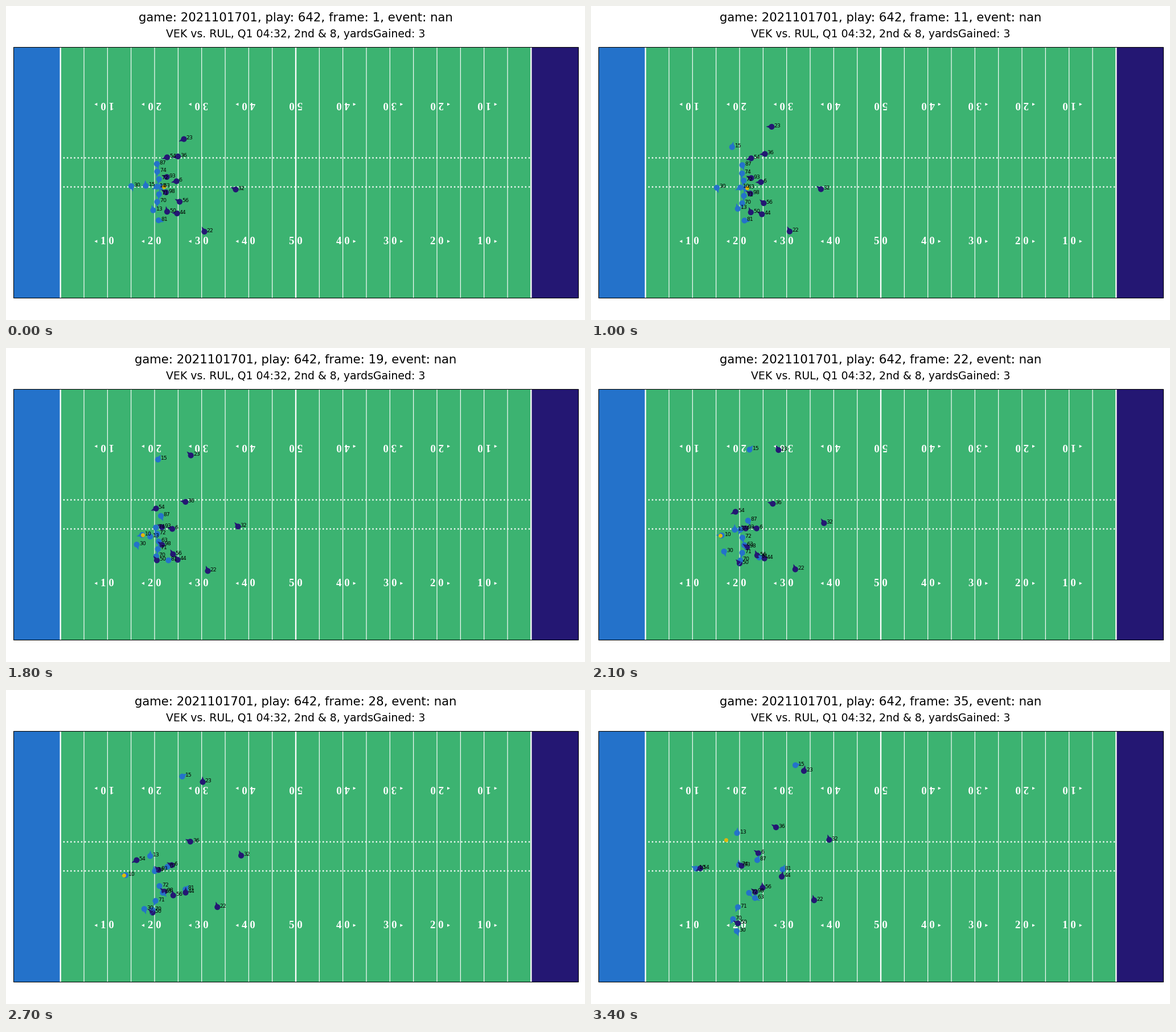
Write a matplotlib script that moves like this. It is 1017 px wide and 551 px high and loops after 3500 ms.

```python
import numpy as np
import matplotlib.pyplot as plt
from matplotlib.animation import FuncAnimation
from matplotlib.collections import PolyCollection
from matplotlib.patches import Polygon, Rectangle

W, H, DPI = 1017, 551, 84.75
FRAMES, INTERVAL = 35, 100
SNAP, RELEASE, LAST = 7, 30, FRAMES - 1
LEFT, RIGHT, TOP, BOTTOM = 13, 1005, 72.5, 512.5
YARD = (RIGHT - LEFT) / 120
BLUE, NAVY, GRASS, GOLD = "#2472CA", "#241773", "mediumseagreen", "#E0B80A"
TIMES = np.arange(FRAMES)

plt.rcParams["font.family"] = "DejaVu Sans"
fig = plt.figure(figsize=(12, (H + 1e-3) / DPI), dpi=DPI, facecolor="white")
ax = fig.add_axes([0, 0, 1, 1])
ax.set_xlim(0, W)
ax.set_ylim(H, 0)
ax.axis("off")


def yard_x(yards):
    return LEFT + yards * YARD


def progress(start, end):
    return np.clip((TIMES - start) / (end - start), 0, 1)


def path(points, start):
    """Spline through evenly timed points; late starters begin at rest."""
    p = np.array(points, float)
    m = np.gradient(p, axis=0)
    m[-1] = 2 * (p[-1] - p[-2]) - m[-2]
    m[0] = 0 if start else 2 * (p[1] - p[0]) - m[1]
    s = progress(start, LAST) * (len(p) - 1)
    i = np.minimum(s.astype(int), len(p) - 2)
    u = (s - i)[:, None]
    a, b = p[i], p[i + 1]
    return (a + (b - a) * u**2 * (3 - 2 * u)
            + u * (1 - u) * (m[i] * (1 - u) - m[i + 1] * u))


def draw_box(x0, x1, **style):
    ax.add_patch(Rectangle((x0, TOP), x1 - x0, BOTTOM - TOP, **style))


def draw_line(xs, ys, **style):
    ax.plot(xs, ys, color="white", snap=False, zorder=1, **style)


def draw_field():
    draw_box(LEFT, RIGHT, fc=GRASS, lw=0, zorder=0)
    draw_box(LEFT, yard_x(10), fc=BLUE, lw=0, zorder=0)
    draw_box(yard_x(110), RIGHT, fc=NAVY, lw=0, zorder=0)
    for yards in range(10, 111, 5):
        draw_line([yard_x(yards)] * 2, [TOP, BOTTOM],
                  lw=1 if (yards - 10) % 50 else 2, solid_capstyle="butt")
    for y in (266.5, 317.5):
        draw_line([yard_x(10.6), yard_x(110)], [y, y], lw=2, ls=":")
    for yards in range(20, 101, 10):
        mark = min(yards - 10, 110 - yards) // 10
        x = yard_x(yards)
        for y, turn in ((172.5, 180), (413, 0)):
            ax.text(x, y, f"{mark} 0", color="white", size=16, rotation=turn,
                    family="Liberation Serif", weight="bold",
                    ha="center", va="center", zorder=2)
            if yards != 60:
                side = np.sign(yards - 60)
                tip, back = x + side * 23, x + side * 18
                ax.add_patch(Polygon([(tip, y), (back, y - 2.6), (back, y + 2.6)],
                                     fc="white", lw=0, zorder=2))
    draw_box(LEFT, RIGHT, fc="none", ec="black", lw=0.9, zorder=3)


class Player:
    def __init__(self, number, color, points, start):
        self.color = color
        self.pos = path(points, start)
        self.label = ax.text(0, 0, str(number), size=8, zorder=8)

    def face_motion(self, start):
        v = np.gradient(self.pos, axis=0)[np.maximum(TIMES, start + 1)]
        self.angle = np.arctan2(-v[:, 1], v[:, 0])

    def turn(self, first, last):
        s = progress(0, LAST)
        self.angle = np.radians(first + (last - first) * s * s * (3 - 2 * s))

    def pointer(self, n):
        a = self.angle[n]
        ahead = np.array([np.cos(a), -np.sin(a)])
        side = np.array([-ahead[1], ahead[0]]) * 3.6
        spot = self.pos[n]
        return [spot + ahead * 10, spot + side, spot - side]


players = []


def attack(number, *points, start=SNAP):
    player = Player(number, BLUE, points, start)
    player.face_motion(start)
    players.append(player)
    return player


def defend(number, first, last, *points, start=SNAP):
    player = Player(number, NAVY, points, start)
    player.turn(first, last)
    players.append(player)


draw_field()

passer = attack(10, (265, 317), (231, 329), (184.5, 313.5))
attack(30, (220, 316), (233, 355), (256, 423))
attack(13, (258.5, 358.5), (252.5, 321), (256.5, 251))
attack(87, (265, 277), (270, 290), (281, 310), (292, 298.5))
attack(81, (268, 376), (280, 375), (309, 357), (336.5, 315))
attack(15, (245.5, 315.5), (250, 239), (286, 170), (359, 132), start=0)

# the line starts as a shallow wedge and slides sideways together
line_ends = {74: (260, 307), 72: (277.5, 356), 63: (288, 365),
             71: (258, 381), 70: (249.5, 402)}
for k, (number, end) in enumerate(line_ends.items()):
    x, y = 272 - 3.2 * abs(k - 2), 290.5 + 13.3 * k
    attack(number, (x, y), (x - 3, y + 28), end)

defend(54, 195, 210, (283, 265.5), (255.5, 286.5), (192, 313))
defend(93, 162, 135, (282.5, 300), (272, 316.5), (264.5, 308.5))
defend(98, 150, 140, (281, 327), (274, 349), (288.5, 354.5))
defend(50, 102, 150, (283, 361), (261.5, 377), (258, 409.5))
defend(6, 192, 145, (299.5, 307.5), (291, 317), (294, 286.5))
defend(56, 150, 95, (305, 343.5), (292, 364), (301.5, 347))
defend(44, 172, 78, (300.5, 364), (304, 370), (335, 327.5))
defend(22, 118, 105, (348.5, 396), (358, 389), (392, 369))
defend(32, 155, 108, (403.5, 322), (409, 308.5), (418.5, 263))
defend(23, 205, 78, (312.5, 233.5), (318.5, 208.5), (333, 174), (374, 142), start=0)
defend(36, 195, 148, (302, 264), (306.5, 260), (321, 273), (325, 241), start=0)

# the ball rides with the passer, then flies straight
ball_path = passer.pos.copy()
ball_path[:, 0] += 12 - 15 * progress(13, 20)
flight = progress(RELEASE, LAST)[:, None]
ball_path += (np.array([237, 263.5]) - ball_path) * flight

colors = [p.color for p in players]
dots = ax.scatter(*np.transpose([p.pos[0] for p in players]), s=75, c=colors,
                  lw=0, zorder=5)
ball = ax.scatter(*ball_path[0], s=36, color=GOLD, lw=0, zorder=6)
pointers = PolyCollection([p.pointer(0) for p in players],
                          facecolors=colors, linewidths=0, zorder=5.5)
ax.add_collection(pointers, autolim=False)

title = ax.text(W / 2, 27.3, "", size=18, ha="center")
ax.text(W / 2, 55.3, "VEK vs. RUL, Q1 04:32, 2nd & 8, yardsGained: 3",
        size=16, ha="center")


def update(n):
    title.set_text(f"game: 2021101701, play: 642, frame: {n + 1}, event: nan")
    dots.set_offsets([p.pos[n] for p in players])
    pointers.set_verts([p.pointer(n) for p in players])
    ball.set_offsets([ball_path[n]])
    for p in players:
        p.label.set_position(p.pos[n] + (4.2, 0.6))
    return []


anim = FuncAnimation(fig, update, frames=FRAMES, init_func=lambda: update(0),
                     interval=INTERVAL, repeat=True, repeat_delay=0)
plt.show()
```
